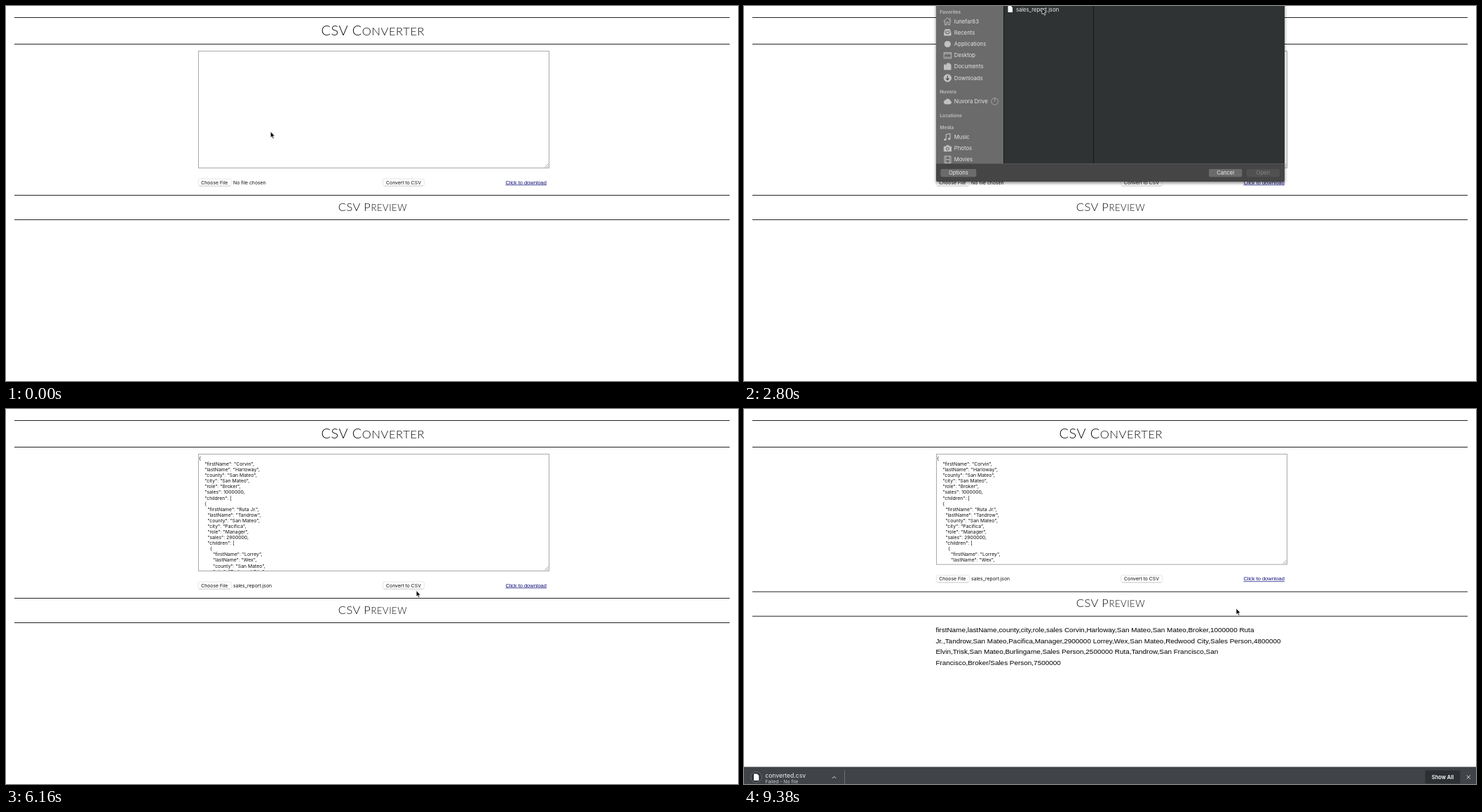
Recreate the animation shown at these times as an HTML page. Size 1044x536 px, loop 9450 ms.

```html
<!DOCTYPE html>
<html lang="en">
<head>
<meta charset="utf-8">
<title>CSV Converter</title>
<style>
  html, body { margin: 0; width: 100%; height: 100%; overflow: hidden; background: #fff; }
  svg { display: block; font-family: Inter, "Open Sans", sans-serif; }
  text { white-space: pre; }
  .head { font-family: Lato, sans-serif; font-weight: 300; text-anchor: middle; fill: #111; }
  .page { font-size: 6.85px; fill: #111; }
  .btn { fill: #fff; stroke: #dcdcdc; stroke-width: .7; }
  .csv { font: 9.95px "Liberation Sans", Arial, sans-serif; }
  .link { font: 7.47px "Liberation Sans", Arial, sans-serif; fill: #12107a; }
  .mid { text-anchor: middle; }
  .end { text-anchor: end; }
  .side { font-size: 7.75px; fill: #e4e4e4; }
  .group { font-size: 6.7px; font-weight: 600; fill: #c0c0c0; }
  .dlg { font-size: 7.6px; fill: #eee; }
  .meta { font-size: 7.35px; fill: #e6e6e6; font-weight: 500; }
  .label { font-size: 7.2px; fill: #a9abab; font-weight: 600; }
</style>
</head>
<body>
<svg width="1044" height="536" viewBox="0 0 1044 536">
  <defs>
    <filter id="shadow" x="-10%" y="-10%" width="120%" height="120%">
      <feDropShadow dx="0" dy="2" stdDeviation="2.2" flood-opacity=".5"/>
    </filter>
    <linearGradient id="fold" x1="0" y1="1" x2="1" y2="0">
      <stop offset="0" stop-color="#fff"/><stop offset=".45" stop-color="#e2e2e2"/><stop offset="1" stop-color="#fafafa"/>
    </linearGradient>
    <clipPath id="area"><rect id="areaClip" x="274" y="65" width="500" height="166"/></clipPath>
  </defs>

  <path d="M12 16.5H1032M12 54.5H1032" stroke="#222"/>
  <text class="head" x="523.3" y="41.5" font-size="20" letter-spacing=".6">CSV C<tspan font-size="16.5">ONVERTER</tspan></text>
  <rect id="box" x="274.5" y="64.5" width="500" height="167" fill="#fff" stroke="#a9a9a9"/>
  <g id="json" class="page" clip-path="url(#area)"></g>

  <g id="lower">
    <path d="M768.5 230.5L773.5 225.5M771.5 230.5L773.5 228.5" stroke="#777" stroke-width=".7"/>
    <rect class="btn" x="274.3" y="247" width="47" height="10" rx="2"/>
    <rect class="btn" x="537.5" y="247" width="59" height="10" rx="2"/>
    <path d="M275.5 257.3H320M539 257.3H595" stroke="#bbb" stroke-width=".6"/>
    <g class="page">
      <text class="mid" x="297.3" y="254.5">Choose File</text>
      <text class="mid" x="567" y="254.5">Convert to CSV</text>
      <text id="chosen" x="324" y="254.5"></text>
    </g>
    <text class="link" x="712.4" y="254.6">Click to download</text>
    <path d="M712.4 255.9H771" stroke="#12107a" stroke-width=".7"/>
    <path d="M12 270.5H1032M12 305.5H1032" stroke="#222"/>
    <text class="head" x="523" y="292.5" font-size="16.5" letter-spacing=".5">CSV P<tspan font-size="13.2">REVIEW</tspan></text>
    <g id="preview" class="csv"></g>
  </g>

  <g id="dialog">
    <rect x="274" y="-80" width="497" height="331" rx="2" fill="#454545" filter="url(#shadow)"/>
    <rect x="370" y="-80" width="401" height="305" fill="#2f3334"/>
    <rect id="sidebar" x="274" y="-80" width="96" height="305"/>
    <path d="M370.5 -80V225M498.5 -80V225" stroke="#17191a"/>
    <path d="M274 225.5H771" stroke="#555"/>
    <g id="places"></g>
    <g id="icons" fill="#c2c2c2" stroke="#c2c2c2" stroke-width=".9">
      <path fill="none" d="M284.5 22L290 16.8L295.5 22M286.3 21V27H288.8V23H291.2V27H293.7V21M294 17V20"/>
      <path d="M287 33.5H293.5L295 38.5V42H285.5V38.5Z"/><path d="M287 36H293.5M286.5 38H288.5V39.5H292V38H294" stroke="#555" fill="none"/>
      <circle cx="290.3" cy="54.5" r="4.6" stroke="none"/>
      <path fill="none" d="M285.2 66.5H295.6V74.8H285.2ZM285.2 68.3H295.6M287 73H289M290 73H292M293 73H294.5"/>
      <path d="M285.5 84H288.5V91H285.5ZM289.5 82H293L295 84.2V91H289.5Z"/>
      <circle cx="290.3" cy="103" r="5.2"/><path d="M290.3 99.8V105.5M288 103.3L290.3 105.8L292.6 103.3" stroke="#4b4b4b" stroke-width="1.2" fill="none"/>
      <path d="M287 140H293.5A2.4 2.4 0 0 0 294 135.4A3.6 3.6 0 0 0 287.4 134.8A2.7 2.7 0 0 0 287 140Z"/>
      <path d="M288.2 191V183.7L294 182.5V189.8" fill="none" stroke-width="1.1"/><ellipse cx="286.8" cy="191" rx="1.4" ry="1.1"/><ellipse cx="292.6" cy="189.9" rx="1.4" ry="1.1"/>
      <path d="M285.2 201H288L289 199.3H292L293 201H295.6V207.5H285.2Z"/><circle cx="290.4" cy="204" r="2" fill="none" stroke="#555"/>
      <path fill="none" d="M286 214.6H295V224.4H286ZM288 214.6V224.4M293 214.6V224.4M288 219.5H293"/>
    </g>
    <g id="progress" fill="none" stroke="#b0b0b0" stroke-width=".8"><circle cx="357.6" cy="136.4" r="4.9"/><path d="M357.6 131.5V136.4"/></g>

    <rect id="row" x="371" y="-5" width="126.5" height="15" fill="#2163d4"/>
    <g id="file">
      <path d="M376.5 0H381L383 2.2V9H376.5Z" fill="#fff"/>
      <text class="dlg" x="388" y="7.6">sales_report.json</text>
    </g>
    <g id="details">
      <path d="M593.5 13H629Q641 13 649 20L669 38Q676 45 676 55V121H593.5Z" fill="#fff"/>
      <path d="M629 13Q644 14 647 26Q648 32 645 39Q664 36 671 43Q676 48 676 57Q676 45 669 38L649 20Q641 13 629 13Z" fill="url(#fold)"/>
      <text class="mid" x="634" y="154.8" font-size="9.5" fill="#e4e4e4">sales_report.json</text>
      <text class="mid label" x="634.3" y="167.2" style="font-size:7.6px">JSON Document - 1 KB</text>
      <g class="label end"><text x="618.5" y="190.2">Tags</text><text x="618.5" y="201.4">Created</text><text x="618.5" y="212.8">Modified</text></g>
      <g class="meta">
        <text x="623.5" y="190.2" style="fill:#6d7172">Add Tags…</text>
        <text x="623.5" y="201.4">Tuesday, June 25, 2019 at 10:50 AM</text>
        <text x="623.5" y="212.8">Tuesday, June 25, 2019 at 10:50 AM</text>
      </g>
    </g>

    <g fill="#6b6b6b"><rect x="280.3" y="233" width="51" height="11.2" rx="2"/><rect x="663" y="233" width="47.3" height="11.2" rx="2"/></g>
    <rect id="open" x="716.7" y="233" width="47.3" height="11.2" rx="2"/>
    <g class="dlg mid"><text x="305.8" y="241.4">Options</text><text x="686.6" y="241.4">Cancel</text><text id="openText" x="740.3" y="241.4">Open</text></g>
  </g>

  <g id="status">
    <path d="M0 0H344Q347 0 347 3V14H0Z" fill="#3a3a3a" filter="url(#shadow)"/>
    <text x="2" y="9.6" font-size="7.4" fill="#e4e4e4">localhost:2000/dist/converted.csv</text>
  </g>
  <g id="badge">
    <circle r="22" fill="#fff" stroke="#999" stroke-width=".8" filter="url(#shadow)"/>
    <path d="M-2.8 -9H2.8V-2H6.5L0 5L-6.5 -2H-2.8ZM-10 12H10V15H-10Z" fill="#7da2ee"/>
  </g>
  <g id="shelf">
    <rect y="511.5" width="1044" height="40" fill="#404347"/>
    <path d="M143.5 516V536" stroke="#6d7073"/>
    <circle cx="17.5" cy="526.2" r="7.7" fill="#33363a" stroke="#696c70"/>
    <path d="M14 521.5H18.7L21.2 524V531H14Z" fill="#fff"/>
    <text x="30.3" y="527.2" font-size="8.6" fill="#f0f0f0">converted.csv</text>
    <text x="30.3" y="534.9" font-size="6.8" fill="#c9cacb">Failed - No file</text>
    <path d="M126 528L128.6 525.2L131.2 528M1030.7 523.5L1035.9 528.7M1035.9 523.5L1030.7 528.7" stroke="#d5d6d7" fill="none"/>
    <rect x="971.5" y="516.5" width="50" height="19" rx="2" fill="#2d3033" stroke="#383b3e"/>
    <text class="mid" x="996.5" y="528.8" font-size="7.5" font-weight="600" fill="#fff">Show All</text>
  </g>
  <path id="cursor" d="M0 0V8.7L2 6.9L3.5 10.2L4.9 9.5L3.5 6.4H6.1Z" fill="#000" stroke="#fff" stroke-width=".7"/>
</svg>

<script>
const $ = id => document.getElementById(id);
const LOOP = 9450, STEP = 70;

const addText = (parent, x, y, str, cls) => {
  const el = document.createElementNS("http://www.w3.org/2000/svg", "text");
  el.setAttribute("x", x);
  el.setAttribute("y", y);
  if (cls) el.setAttribute("class", cls);
  el.textContent = str;
  $(parent).append(el);
};

const person = (x, first, last, county, city, role, sales) => [
  [x, `"firstName": "${first}",`], [x, `"lastName": "${last}",`],
  [x, `"county": "${county}",`], [x, `"city": "${city}",`],
  [x, `"role": "${role}",`], [x, `"sales": ${sales},`], [x, '"children": [']
];
[
  [275.3, "{"],
  ...person(283.2, "Corvin", "Harloway", "San Mateo", "San Mateo", "Broker", 1000000),
  [283.2, "{"],
  ...person(287.2, "Ruta Jr.", "Tandrow", "San Mateo", "Pacifica", "Manager", 2900000),
  [291.2, "{"],
  ...person(295.1, "Lorrey", "Wex", "San Mateo", "Redwood City", "Sales Person", 4800000).slice(0, 4)
].forEach(([x, str], i) => addText("json", x, 73 + i * 8.08, str));

[
  "firstName,lastName,county,city,role,sales Corvin,Harloway,San Mateo,San Mateo,Broker,1000000 Ruta",
  "Jr.,Tandrow,San Mateo,Pacifica,Manager,2900000 Lorrey,Wex,San Mateo,Redwood City,Sales Person,4800000",
  "Elvin,Trisk,San Mateo,Burlingame,Sales Person,2500000 Ruta,Tandrow,San Francisco,San",
  "Francisco,Broker/Sales Person,7500000"
].forEach((str, i) => addText("preview", 273.4, 328.4 + i * 15.55, str));

[["Favorites", 8], ["Nuvora", 122.5], ["Locations", 156], ["Media", 173.5]]
  .forEach(([str, y]) => addText("places", 279.3, y + 2.5, str, "group"));
[["lunefar83", 22], ["Recents", 38], ["Applications", 54.5], ["Desktop", 70.5], ["Documents", 86.5],
 ["Downloads", 103], ["Nuvora Drive", 136.5], ["Music", 187.5], ["Photos", 203.5], ["Movies", 219.5]]
  .forEach(([str, y]) => addText("places", 299.8, y + 2.8, str, "side"));

// Pointer stops: time, x, y
const path = [
  [0, 377.3, 179.5], [840, 303, 240], [980, 303, 240], [1050, 316.4, 250.5], [1680, 316.4, 250.5],
  [2170, 431, 40], [2380, 431, 40], [2800, 425, 3], [3500, 425, 3], [4060, 725.8, 222.5],
  [4480, 736, 240], [5460, 736, 240], [6160, 585.2, 259.5], [6440, 574, 250], [7490, 574, 250],
  [7910, 733.2, 255.2], [8540, 733.2, 255.2], [9100, 702, 285]
];

const ramp = (t, a, b) => Math.min(1, Math.max(0, (t - a) / (b - a)));
const ease = v => v * v * (3 - 2 * v);
const show = (id, on) => $(id).style.display = on ? "" : "none";
const move = (id, x, y) => $(id).setAttribute("transform", `translate(${x} ${y})`);

function pointer(t) {
  const i = path.findIndex(p => p[0] > t);
  if (i < 0) return path.at(-1).slice(1);
  const [t0, x0, y0] = path[i - 1], [t1, x1, y1] = path[i];
  const k = ease(ramp(t, t0, t1));
  return [x0 + (x1 - x0) * k, y0 + (y1 - y0) * k];
}

function draw(t) {
  move("cursor", ...pointer(t));

  show("dialog", t >= 1260 && t < 4830);
  move("dialog", 0, -240 * (1 - ramp(t, 1260, 1540)) - 240 * ramp(t, 4480, 4760));
  const grey = 64 + 43 * ramp(t, 1750, 2100);
  $("sidebar").setAttribute("fill", `rgb(${grey},${grey},${grey})`);
  $("icons").style.opacity = .85 + .15 * ramp(t, 1750, 2100);
  show("file", t >= 1960);
  show("progress", t >= 2450);
  const picked = t >= 2940;
  show("row", picked);
  show("details", t >= 3010);
  $("open").setAttribute("fill", picked ? "#2f6fe4" : "#515151");
  $("openText").style.fill = picked ? "#fff" : "#858585";

  const loaded = t >= 5040;
  show("json", loaded);
  $("chosen").textContent = loaded ? "sales_report.json" : "No file chosen";
  show("preview", t >= 6580);

  const up = ease(ramp(t, 8540, 8750));
  move("lower", 0, -9.3 * up);
  $("box").setAttribute("height", 167 - 9.3 * up);
  $("areaClip").setAttribute("height", 166 - 9.3 * up);
  move("shelf", 0, 25 * (1 - up));
  show("shelf", up > 0);

  $("status").style.opacity = ramp(t, 7840, 8050) * (1 - ramp(t, 8470, 8720));
  move("status", 0, 522 - 18 * ramp(t, 8400, 8540));

  const v = ramp(t, 8120, 8610);
  $("badge").style.opacity = 1 - 4 * (v - .5) ** 2;
  move("badge", 22.3, 558 - 92 * v);
}

function tick(now) {
  draw(Math.floor(now % LOOP / STEP) * STEP);
  requestAnimationFrame(tick);
}
draw(0);
requestAnimationFrame(tick);
</script>
</body>
</html>
```
